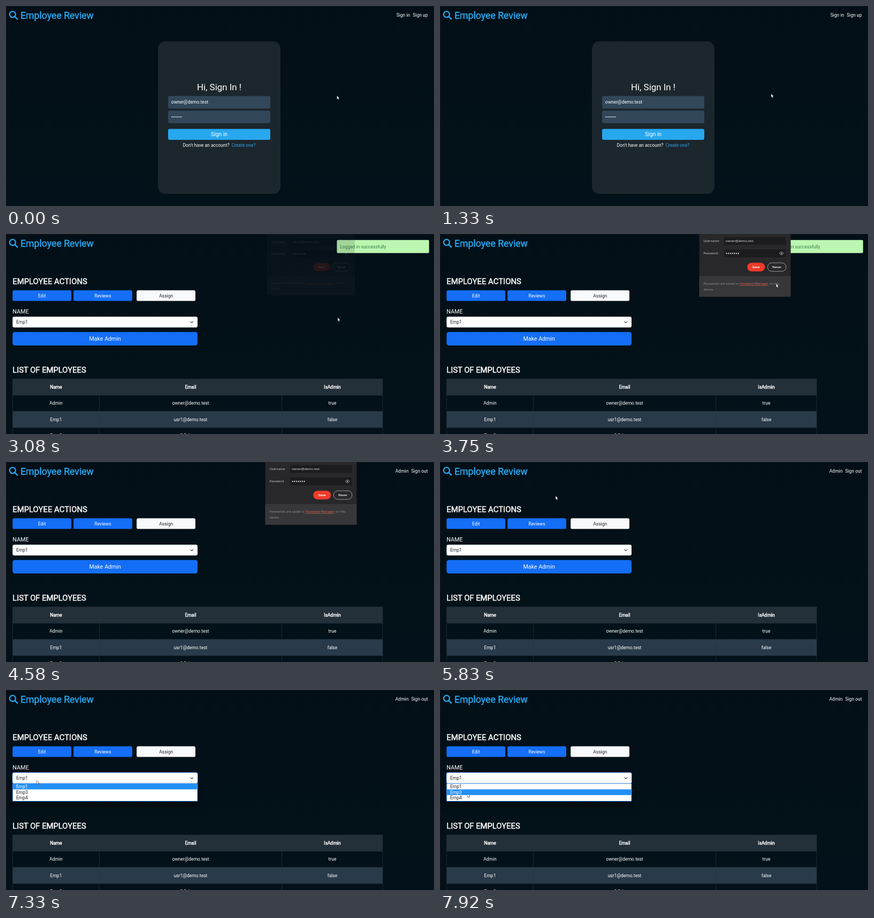
Animation, 800 px wide and 375 px high, one loop 8000 ms. Source, as an HTML page:

```html
<!DOCTYPE html>
<html lang="en">
<head>
<meta charset="utf-8">
<title>Employee Review</title>
<style>
  html, body { margin: 0; width: 100%; height: 100%; overflow: hidden; background: #03111a; }
  svg { display: block; width: 800px; height: 375px; font-family: Roboto, sans-serif; white-space: pre; }
  .heavy { stroke: currentColor; stroke-width: .45px; }
  #popup { font-family: "Open Sans", "Noto Sans", sans-serif; }
  #list { filter: drop-shadow(0 9px 8px rgba(0, 0, 0, .4)); }
</style>
</head>
<body>
<svg id="stage" viewBox="0 0 800 375"></svg>
<script>
const LOOP = 8000, FPS = 12;
const BLUE = '#146ef6', SKY = '#27a7ee', INK = '#212529', LINE = '#26333d';
const ADMIN_MAIL = 'owner@demo.test';

const text = (x, y, label, { size = 8.5, fill = '#fff', anchor = 'start', heavy = false, extra = '' } = {}) =>
  `<text x="${x}" y="${y}" font-size="${size}" fill="${fill}" text-anchor="${anchor}"
    ${heavy ? `class="heavy" color="${fill}"` : ''} ${extra}>${label}</text>`;
const mid = (x, y, label, options) => text(x, y, label, { anchor: 'middle', ...options });
const box = (x, y, w, h, fill, r = 0, extra = '') =>
  `<rect x="${x}" y="${y}" width="${w}" height="${h}" rx="${r}" fill="${fill}" ${extra}/>`;
const path = (d, stroke, width = 1, fill = 'none') =>
  `<path d="${d}" stroke="${stroke}" stroke-width="${width}" fill="${fill}"/>`;
const group = (id, ...parts) => `<g id="${id}">${parts.join('')}</g>`;

const header = () => [
  '<circle cx="12.3" cy="15.7" r="5.5" fill="none" stroke="#27a7ee" stroke-width="2.3"/>',
  path('M16.4 19.8L21.8 25.2', SKY, 2.5),
  text(27, 23.5, 'Employee Review', { size: 17.7, fill: SKY, heavy: true }),
].join('');

const signIn = () => group('signIn',
  text(729.7, 20.4, 'Sign in'),
  text(760.3, 20.4, 'Sign up'),
  box(284, 66.3, 229, 286, '#1c262d', 14),
  mid(398.6, 158.2, 'Hi, Sign In !', { size: 16.9 }),
  box(303, 168.7, 191, 23.6, '#32475a', 3),
  text(308.8, 183.4, ADMIN_MAIL),
  box(303, 196.2, 191, 23.6, '#32475a', 3),
  text(308.8, 211.1, '•'.repeat(7)),
  box(303, 230.5, 191, 20.4, SKY, 3),
  mid(398.5, 244.2, 'Sign in', { size: 10.3 }),
  text(330.5, 264.4, "Don't have an account?"),
  text(421.5, 264.4, 'Create one?', { fill: '#2f9fe6' }));

const tableRow = (y, cells, heavy) =>
  [93.5, 345, 610].map((x, i) => mid(x, y, cells[i], { heavy })).join('');

const table = () => [
  box(12.5, 271.8, 691.5, 30.4, '#232f39'),
  box(12.5, 332.6, 691.5, 30.4, '#293b4a'),
  path('M12.5 375V271.8H704V375M174.5 271.8V375M515.5 271.8V375M12.5 302.2H704M12.5 332.6H704M12.5 363H704', LINE, .7),
  tableRow(290.1, ['Name', 'Email', 'IsAdmin'], true),
  tableRow(320.2, ['Admin', ADMIN_MAIL, 'true']),
  tableRow(350.6, ['Emp1', 'usr1@demo.test', 'false']),
  tableRow(381, ['Emp2', 'usr2@demo.test', 'true']),
].join('');

const dashboard = () => group('dashboard',
  text(727.8, 20.4, 'Admin'),
  text(757.5, 20.4, 'Sign out'),
  text(12.2, 93.5, 'EMPLOYEE ACTIONS', { size: 14.9, heavy: true }),
  box(12.3, 105.4, 109.7, 20.2, BLUE, 3.2),
  box(126.2, 105.4, 109.7, 20.2, BLUE, 3.2),
  box(244.2, 105.4, 109.8, 20.2, '#f8f9fa', 3.2),
  mid(67.3, 118.6, 'Edit'),
  mid(181, 118.6, 'Reviews'),
  mid(299.2, 118.6, 'Assign', { fill: INK }),
  text(12.2, 148.7, 'NAME', { size: 10.8 }),
  box(12.3, 183.7, 345.7, 25.4, BLUE, 4.2),
  mid(185.2, 200.2, 'Make Admin', { size: 10.65 }),
  '<rect id="focus" x="11.3" y="154" width="347.7" height="22.2" rx="4" fill="#1b56ad"/>',
  box(12.3, 155, 345.7, 20.2, '#fff', 3.2),
  text(19, 168.4, 'Emp1', { fill: INK }),
  path('M344.6 163.8L347.3 166.5L350 163.8', '#343a40', 1.1),
  text(12.2, 259.6, 'LIST OF EMPLOYEES', { size: 14.8, heavy: true }),
  table());

const options = ['Emp1', 'Emp3', 'Emp4'];
const optionTop = i => 175.6 + i * 10.7;
const dropdown = () => group('list',
  box(12.3, 175.3, 345.7, 33.2, '#fff', 1, `stroke="${BLUE}" stroke-width=".8"`),
  '<rect id="pick" x="12.7" width="344.9" height="10.7" fill="#2390f7"/>',
  ...options.map((name, i) => text(19, optionTop(i) + 8.2, name, { extra: 'data-option' })));

const toast = () => group('toast',
  box(618.5, 11.3, 172.3, 24.5, '#bcf7b1', 2),
  text(624.3, 26.6, 'Logged in successfully', { fill: '#3c8147' }));

const popup = () => {
  const small = (x, y, label, fill = '#d6d6d8', size = 6) => text(x, y, label, { size, fill });
  return group('popup',
    box(484.6, -6, 170.9, 123.6, '#28272a', 2),
    box(484.6, 79, 170.9, 38.6, '#373739'),
    small(492.5, 15, 'Username'),
    box(530.3, 5, 117, 16, '#1c1b1e', 2, 'stroke="#353438" stroke-width=".6"'),
    small(534, 15.2, ADMIN_MAIL, '#eee', 6.1),
    small(492.5, 38.2, 'Password'),
    box(530.3, 28, 117, 16.4, '#1c1b1e', 2, 'stroke="#353438" stroke-width=".6"'),
    ...Array.from({ length: 7 }, (_, i) => `<circle cx="${535.7 + i * 3.65}" cy="36.4" r="1.15" fill="#eee"/>`),
    path('M634.4 36.2Q638.3 30.8 642.2 36.2Q638.3 41.6 634.4 36.2Z', '#aaa', .9),
    '<circle cx="638.3" cy="36.2" r="1.3" fill="#aaa"/>',
    box(574.3, 54, 33, 16, '#f03c2b', 8, 'stroke="#a83328" stroke-width=".8"'),
    mid(590.6, 64.1, 'Save', { size: 6, extra: 'font-weight="700"' }),
    box(612.3, 54, 34.6, 16, 'none', 8, 'stroke="#b9b9bb" stroke-width=".8"'),
    mid(629.6, 64.1, 'Never', { size: 6, extra: 'font-weight="600"' }),
    small(492.5, 95.4, 'Passwords are saved to', '#97979a'),
    text(560, 95.4, 'Password Manager', { size: 6, fill: '#ee6a50', extra: 'text-decoration="underline"' }),
    small(615.2, 95.4, 'on this', '#97979a'),
    small(492.5, 106.2, 'device.', '#97979a'));
};

const cursor = () => group('cursor',
  path('M0 0V7L1.6 5.6L2.7 8L3.9 7.5L2.9 5.1H4.9Z', '#10151a', .5, '#fff'));

const stage = document.getElementById('stage');
stage.innerHTML = `
  <linearGradient id="night" x2="0" y2="1">
    <stop stop-color="#030f17"/><stop offset="1" stop-color="#03121a"/>
  </linearGradient>` +
  box(0, 0, 800, 375, 'url(#night)') + path('M.5 375V.5H800', '#14131c', 1) +
  header() + signIn() + dashboard() + dropdown() + toast() + popup() + cursor();

const part = id => document.getElementById(id);
const [signInEl, dashboardEl, focusEl, listEl, pickEl, toastEl, popupEl, cursorEl] =
  ['signIn', 'dashboard', 'focus', 'list', 'pick', 'toast', 'popup', 'cursor'].map(part);
const optionEls = [...stage.querySelectorAll('[data-option]')];

// Each step: time in ms, then the values reached at that time.
const cursorSteps = [
  [0, 618.5, 168], [1000, 618.5, 168], [1900, 620, 156.5], [3500, 620, 156.5],
  [4100, 642, -12], [4700, 642, -12], [5000, 480, 18], [5600, 216, 63.5],
  [5950, 216, 63.5], [6600, 66, 159], [7000, 57.3, 169.5], [7500, 57.3, 169.5],
  [7800, 51, 194],
];
const toastSteps = [[2830, 185], [3000, 0], [4300, 0], [4500, 185]];
const popupSteps = [[3000, 0, .95], [3080, .15, .957], [3300, 1, 1], [4680, 1, 1], [4830, 0, .95]];

const ease = p => p * p * (3 - 2 * p);
function sample(steps, t) {
  const next = steps.findIndex(step => step[0] > t);
  if (next === 0) return steps[0].slice(1);
  if (next < 0) return steps[steps.length - 1].slice(1);
  const a = steps[next - 1], b = steps[next];
  const p = ease((t - a[0]) / (b[0] - a[0]));
  return a.slice(1).map((v, i) => v + (b[i + 1] - v) * p);
}
const show = (el, on) => el.setAttribute('display', on ? 'inline' : 'none');

function render(now) {
  const tick = 1000 / FPS;
  const t = Math.floor((now % LOOP) / tick + .05) * tick;
  const signedIn = t >= 2740, open = t >= 6950;
  show(signInEl, !signedIn);
  show(dashboardEl, signedIn);
  show(focusEl, open);
  show(listEl, open);

  const picked = t < 7650 ? 0 : 1;
  pickEl.setAttribute('y', optionTop(picked));
  optionEls.forEach((el, i) => el.setAttribute('fill', i === picked ? '#fff' : INK));

  const [slide] = sample(toastSteps, t);
  toastEl.setAttribute('transform', `translate(${slide})`);

  const [alpha, scale] = sample(popupSteps, t);
  popupEl.setAttribute('opacity', alpha);
  popupEl.setAttribute('transform', `translate(570 58) scale(${scale}) translate(-570 -58)`);

  cursorEl.setAttribute('transform', `translate(${sample(cursorSteps, t)})`);
}

function frame() {
  render(performance.now());
  requestAnimationFrame(frame);
}
frame();
</script>
</body>
</html>
```
